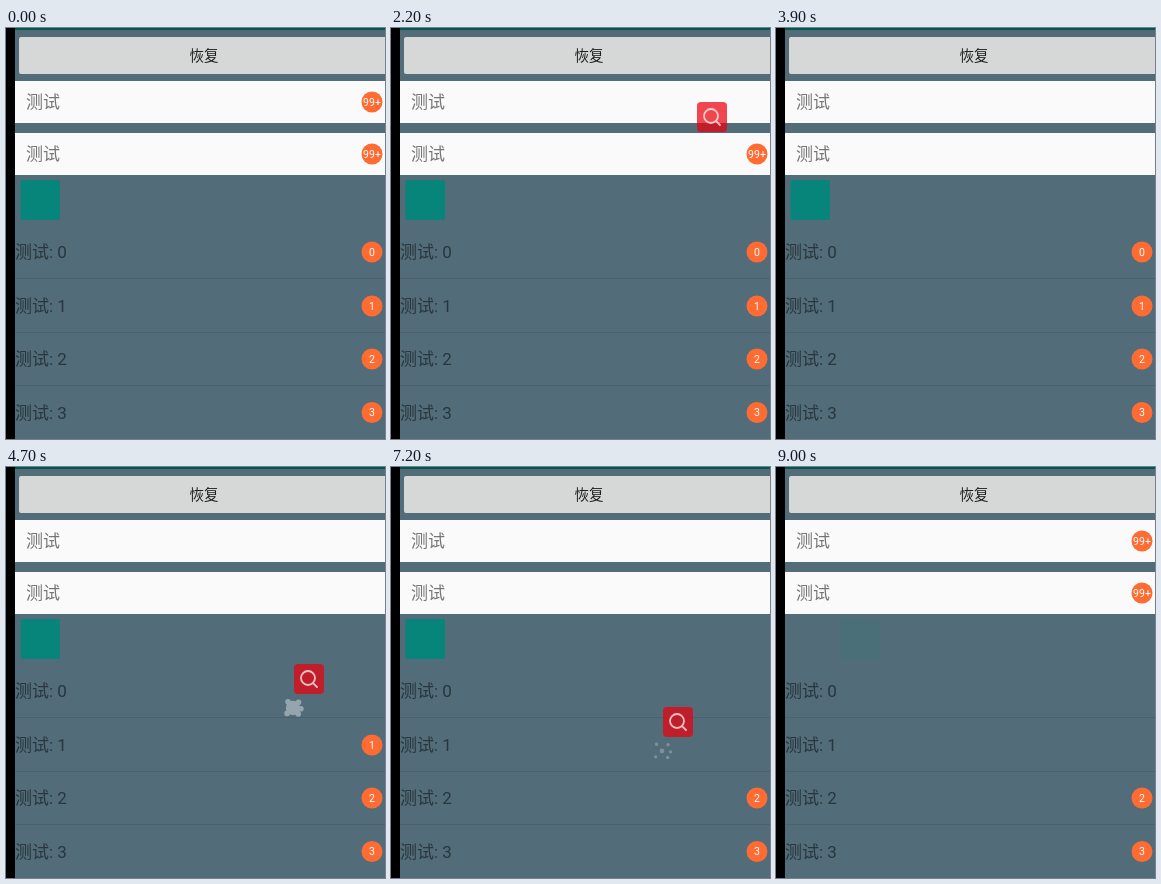
An HTML page with a canvas that plays this animation: 379 by 411 pixels, repeating every 9200 ms.

```html
<!DOCTYPE html>
<html lang="zh">
<head>
<meta charset="utf-8">
<title>Badge drag</title>
<style>
html, body { margin: 0; width: 100%; height: 100%; overflow: hidden; background: #000; }
canvas { display: block; width: 379px; height: 411px; }
</style>
</head>
<body>
<canvas id="stage" width="379" height="411"></canvas>
<script>
const ctx = document.getElementById('stage').getContext('2d');
const LOOP = 9200, STEP = 100;
const FONT = 'Roboto, "Noto Sans CJK SC", "Noto Sans CJK", sans-serif';
const BADGE_X = 366, BADGE_R = 10.5, SNAP = 66;

// start/end of the drag, release (burst), end of burst, restore time
const badges = [
  { y: 74, label: '99+', to: [306, 118], drag: [700, 1400], burst: [1700, 2000], back: 8200 },
  { y: 126, label: '99+', to: [312, 170], drag: [2500, 3100], burst: [3400, 3600], back: 8200 },
  { y: 224, label: '0', to: [287, 241], drag: [4100, 4500], burst: [4700, 5000], back: LOOP },
  { y: 278, label: '1', to: [271, 284], drag: [6500, 6800], burst: [7000, 7300], back: LOOP },
  { y: 331, label: '2' },
  { y: 384.5, label: '3' }
];

// search popups: x, y, shown from, shown until
const popups = [
  [306, 74, 1600, 2400],
  [312, 126, 3400, 3900],
  [288, 197, 4700, 5400],
  [325, 235, 5900, 6400],
  [272, 240, 7100, 7900]
];

const clamp = v => Math.max(0, Math.min(1, v));
const span = (t, a, b) => clamp((t - a) / (b - a));

function rect(x, y, w, h, color) {
  ctx.fillStyle = color;
  ctx.fillRect(x, y, w, h);
}

function roundRect(x, y, w, h, r, color) {
  ctx.beginPath();
  ctx.roundRect(x, y, w, h, r);
  ctx.fillStyle = color;
  ctx.fill();
}

function disc(x, y, r, color) {
  ctx.beginPath();
  ctx.arc(x, y, r, 0, Math.PI * 2);
  ctx.fillStyle = color;
  ctx.fill();
}

function text(str, x, y, size, color, align = 'left', weight = 400) {
  ctx.font = `${weight} ${size}px ${FONT}`;
  ctx.textAlign = align;
  ctx.fillStyle = color;
  ctx.fillText(str, x, y);
}

function badge(x, y, label) {
  disc(x, y, BADGE_R, '#ff6c33');
  text(label, x, y + 3.8, 10.5, '#fff', 'center');
}

// Sticky band between the anchor and the dragged badge.
function band(x0, y0, x1, y1) {
  const d = Math.hypot(x1 - x0, y1 - y0);
  if (d < 1 || d > SNAP) return;
  const r0 = BADGE_R * (1 - d / 70), r1 = BADGE_R - 2;
  const nx = -(y1 - y0) / d, ny = (x1 - x0) / d;
  const mx = (x0 + x1) / 2, my = (y0 + y1) / 2;
  disc(x0, y0, r0, '#f00');
  ctx.beginPath();
  ctx.moveTo(x0 + nx * r0, y0 + ny * r0);
  ctx.quadraticCurveTo(mx, my, x1 + nx * r1, y1 + ny * r1);
  ctx.lineTo(x1 - nx * r1, y1 - ny * r1);
  ctx.quadraticCurveTo(mx, my, x0 - nx * r0, y0 - ny * r0);
  ctx.fill();
}

function puff(x, y, p) {
  const lobes = [-2.25, -0.8, 0.1, 0.85, 2.4];
  const add = (cx, cy, r) => {
    ctx.moveTo(cx + r, cy);
    ctx.arc(cx, cy, r, 0, Math.PI * 2);
  };
  ctx.beginPath();
  add(x, y, 7.2 * (1 - p));
  for (const a of lobes) {
    const d = 8 + p;
    add(x + Math.cos(a) * d, y + Math.sin(a) * d, 2.8 * (1 - p * 0.6));
  }
  ctx.fillStyle = `rgba(190,200,205,${0.62 * (1 - p * 0.5)})`;
  ctx.fill();
}

function popup(x, y) {
  ctx.save();
  ctx.globalAlpha = 0.72;
  roundRect(x, y, 30, 30, 4, '#ec000c');
  ctx.strokeStyle = '#fff';
  ctx.lineWidth = 1.8;
  ctx.lineCap = 'round';
  ctx.beginPath();
  ctx.arc(x + 14, y + 14, 7, 0, Math.PI * 2);
  ctx.moveTo(x + 19.3, y + 19.3);
  ctx.lineTo(x + 23, y + 23);
  ctx.stroke();
  ctx.restore();
}

function button(t) {
  roundRect(13, 9, 370, 37, 2, '#d6d7d7');
  if (t >= 8100 && t < 8700) {
    const fade = 1 - span(t, 8200, 8700);
    ctx.save();
    ctx.beginPath();
    ctx.rect(13, 9, 366, 37);
    ctx.clip();
    rect(13, 9, 366, 37, `rgba(0,0,0,${0.035 * fade})`);
    disc(215, 27, 26 + 18 * span(t, 8100, 8200) + 70 * (1 - fade), `rgba(0,0,0,${0.045 * fade})`);
    ctx.restore();
  }
  text('恢复', 198, 33, 14.5, '#202020', 'center', 500);
}

function tile(t) {
  const p = span(t, 8500, 9000);
  ctx.globalAlpha = 1 - 0.9 * p;
  roundRect(14.5 + 50 * p, 152, 39.5, 40, 2, '#08857a');
  ctx.globalAlpha = 1;
}

function drawBadge(b, t) {
  if (!b.to || t <= b.drag[0] || t >= b.back) return badge(BADGE_X, b.y, b.label);
  const [x, y] = b.to;
  if (t < b.burst[0]) {
    const p = Math.pow(span(t, ...b.drag), 1.2);
    const bx = BADGE_X + (x - BADGE_X) * p, by = b.y + (y - b.y) * p;
    band(BADGE_X, b.y, bx, by);
    badge(bx, by, b.label);
  } else if (t < b.burst[1]) {
    puff(x, y, span(t, ...b.burst));
  }
}

function draw(t) {
  rect(0, 0, 379, 411, '#000');
  rect(9, 0, 370, 411, '#526c79');
  rect(9, 0, 370, 2, '#00574b');
  button(t);
  for (const y of [53, 105]) {
    rect(9, y, 370, 42, '#fafafa');
    text('测试', 20, y + 27, 17, '#757575');
  }
  tile(t);
  for (let i = 0; i < 4; i++) {
    const y = 224 + i * 53.5;
    text('测试: ' + i, 9, y + 6, 17, '#29363d');
    if (i < 3) rect(9, Math.round(y + 26), 370, 1, '#4a626d');
  }
  for (const [x, y, from, to] of popups) if (t >= from && t < to) popup(x, y);
  for (const b of badges) drawBadge(b, t);
}

const start = performance.now();
function tick() {
  const t = (performance.now() - start) % LOOP;
  draw(Math.floor(t / STEP) * STEP);
  requestAnimationFrame(tick);
}
tick();
</script>
</body>
</html>
```
